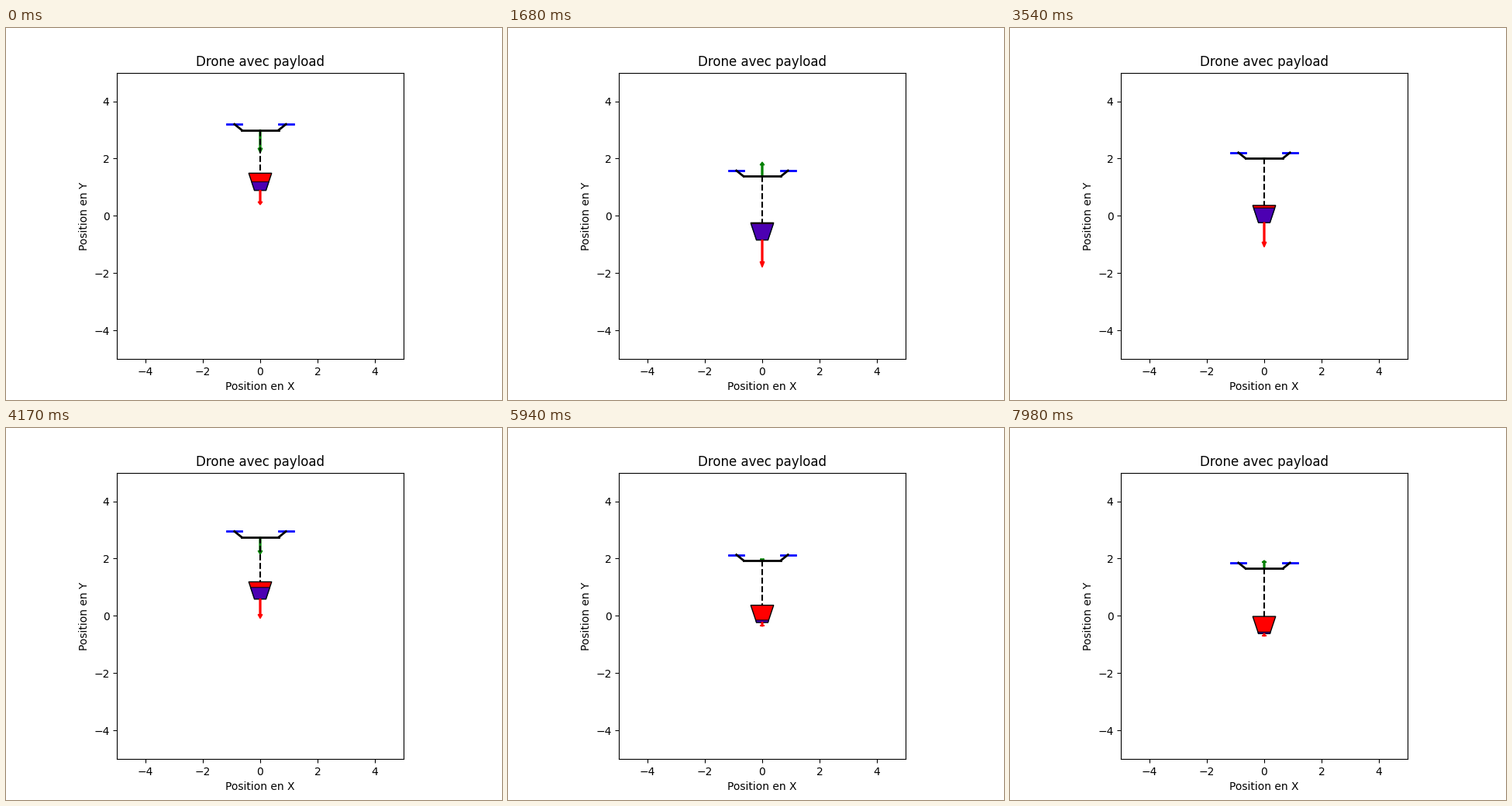
Recreate the animation shown at these times as a matplotlib script. Size 640 by 480 pixels, loop 8 s.

```python
import numpy as np
import matplotlib.pyplot as plt
from matplotlib.animation import FuncAnimation
from matplotlib.patches import FancyArrow, Polygon

LOOP_MS = 8000
FRAMES = 267
TOP, BOTTOM, HEIGHT = 0.4, 0.2, 0.6  # bucket half-widths and height

fig, ax = plt.subplots(figsize=(6.4, 4.8), dpi=100)
ax.set(xlim=(-5, 5), ylim=(-5, 5), aspect="equal", title="Drone avec payload",
       xlabel="Position en X", ylabel="Position en Y")


def make_arrow(color):
    arrow = FancyArrow(0, 0, 0, 1, width=0.05, head_width=0.15, head_length=0.2,
                       length_includes_head=True, color=color)
    return ax.add_patch(arrow)


def aim(arrow, y, length):
    arrow.set_data(x=0, y=y, dx=0, dy=length, head_length=0.2 * abs(length))


def bucket(y, level):
    """Corners of the bucket standing at y, filled up to level (0 to 1)."""
    w = BOTTOM + (TOP - BOTTOM) * level
    h = y + HEIGHT * level
    return [(-BOTTOM, y), (BOTTOM, y), (w, h), (-w, h)]


shell = ax.add_patch(Polygon(bucket(0, 1), fc="red", ec="black"))
liquid = ax.add_patch(Polygon(bucket(0, 1), fc="blue", ec="black", alpha=0.7))
thrust = make_arrow("green")
weight = make_arrow("red")

# Line parts of the drone: x values, heights above the body, colour
PARTS = [
    ((-1.15, -0.65), (0.2, 0.2), "blue"),
    ((0.65, 1.15), (0.2, 0.2), "blue"),
    ((-0.65, 0.65), (0, 0), "black"),
    ((-0.65, -0.9), (0, 0.2), "black"),
    ((0.65, 0.9), (0, 0.2), "black"),
]
lines = [ax.plot(xs, ys, color=c, lw=2)[0] for xs, ys, c in PARTS]
rope, = ax.plot([0, 0], [0, 0], "k--", lw=1.5)


def update(i):
    phase = 0.04 * i
    y = 2 + np.cos(phase)
    mass = 0.5 + 0.5 * np.sin(phase / 2)
    hook = y - 1.6 + 0.1 * np.cos(phase - 0.45)
    base = hook - HEIGHT

    for line, (_, ys, _) in zip(lines, PARTS):
        line.set_ydata([y + dy for dy in ys])
    rope.set_ydata([y, hook])
    shell.set_xy(bucket(base, 1))
    liquid.set_xy(bucket(base, mass))
    aim(thrust, y, 0.8 * (2 - y))
    aim(weight, base, -mass)
    return [*lines, rope, shell, liquid, thrust, weight]


anim = FuncAnimation(fig, update, frames=FRAMES, interval=LOOP_MS / FRAMES,
                     init_func=lambda: update(0), repeat=True, repeat_delay=0)
plt.show()
```
